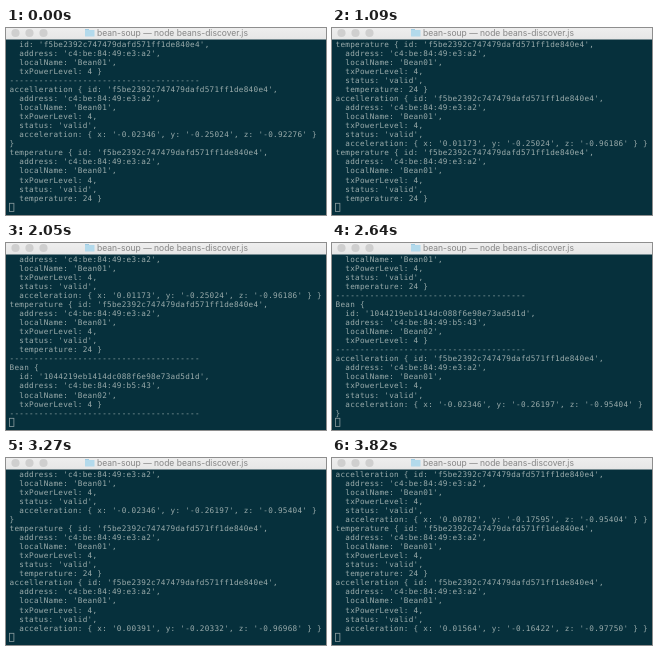
Write an HTML page with a canvas that moves like this. It is 320 by 187 pixels and loops after 3.87 s.

```html
<!DOCTYPE html>
<html lang="en">
<head>
<meta charset="utf-8">
<title>Terminal</title>
<style>
  html, body { margin: 0; width: 100%; height: 100%; overflow: hidden; background: #06303c; }
  canvas { display: block; width: 320px; height: 187px; }
</style>
</head>
<body>
<canvas id="stage"></canvas>
<script>
const W = 320, H = 187, LOOP = 3870;
const COLS = 64, ROWS = 18;
const CELL = 4.88, PITCH = 9.06, LEFT = 3.5, BASE = 18.6;
const BAR = 11.5;

const canvas = document.getElementById('stage');
const ctx = canvas.getContext('2d');
const ratio = window.devicePixelRatio || 1;
canvas.width = W * ratio;
canvas.height = H * ratio;
ctx.scale(ratio, ratio);

// Log output
const ID = 'f5be2392c747479dafd571ff1de840e4';
const ADDRESS = 'c4:be:84:49:e3:a2';
const RULE = '-'.repeat(39);

const reading = (kind, value) => [
  `${kind} { id: '${ID}',`,
  `  address: '${ADDRESS}',`,
  "  localName: 'Bean01',",
  '  txPowerLevel: 4,',
  "  status: 'valid',",
  `  ${value} }`
];
const accel = (x, y, z) =>
  reading('accelleration', `acceleration: { x: '${x}', y: '${y}', z: '${z}' }`);
const temp = () => reading('temperature', 'temperature: 24');
const found = (id, address, name) => [
  RULE,
  'Bean {',
  `  id: '${id}',`,
  `  address: '${address}',`,
  `  localName: '${name}',`,
  '  txPowerLevel: 4 }',
  RULE
];

const events = [
  [0, found(ID, ADDRESS, 'Bean01')],
  [0, accel('-0.02346', '-0.25024', '-0.92276')],
  [0, temp()],
  [500, accel('0.01173', '-0.25024', '-0.96186')],
  [860, temp()],
  [1410, found('1044219eb1414dc088f6e98e73ad5d1d', 'c4:be:84:49:b5:43', 'Bean02')],
  [2090, accel('-0.02346', '-0.26197', '-0.95404')],
  [3050, temp()],
  [3230, accel('0.00391', '-0.20332', '-0.96968')],
  [3410, temp()],
  [3500, accel('0.00782', '-0.17595', '-0.95404')],
  [3680, temp()],
  [3820, accel('0.01564', '-0.16422', '-0.97750')]
];

const wrap = line => line.match(new RegExp(`.{1,${COLS}}`, 'g'));

function visibleLines(count) {
  return events.slice(0, count).flatMap(e => e[1]).flatMap(wrap).slice(-ROWS);
}

function drawBar() {
  const fill = ctx.createLinearGradient(0, 0, 0, BAR);
  fill.addColorStop(0, '#eeeeee');
  fill.addColorStop(1, '#e6e6e6');
  ctx.fillStyle = fill;
  ctx.fillRect(0, 0, W, BAR);

  ctx.fillStyle = '#cfcfcf';
  for (let i = 0; i < 3; i++) {
    ctx.beginPath();
    ctx.arc(9.5 + i * 14, 5, 4.1, 0, Math.PI * 2);
    ctx.fill();
  }

  // Folder icon
  ctx.fillStyle = '#9fcbe2';
  ctx.fillRect(79, 1, 4, 2);
  ctx.fillStyle = '#b3daec';
  ctx.fillRect(79, 2, 9.5, 6.5);

  ctx.fillStyle = '#858585';
  ctx.font = '8.5px Inter, "Liberation Sans", sans-serif';
  ctx.fillText('bean-soup \u2014 node beans-discover.js', 91, 8);
}

function drawScreen(lines) {
  ctx.fillStyle = '#06303c';
  ctx.fillRect(0, 0, W, H);
  drawBar();

  ctx.fillStyle = '#9aabab';
  ctx.font = '7.67px "DejaVu Sans Mono", monospace';
  lines.forEach((line, row) => {
    [...line].forEach((ch, col) => {
      if (ch !== ' ') ctx.fillText(ch, LEFT + col * CELL, BASE + row * PITCH);
    });
  });

  ctx.strokeStyle = '#8a9c9e';
  ctx.lineWidth = 0.8;
  ctx.strokeRect(3.5, 175.3, 4.4, 8.2);
}

let shown = 0;
function tick() {
  const t = performance.now() % LOOP;
  const count = events.filter(e => e[0] <= t).length;
  if (count !== shown) {
    shown = count;
    drawScreen(visibleLines(count));
  }
  requestAnimationFrame(tick);
}
tick();
</script>
</body>
</html>
```
